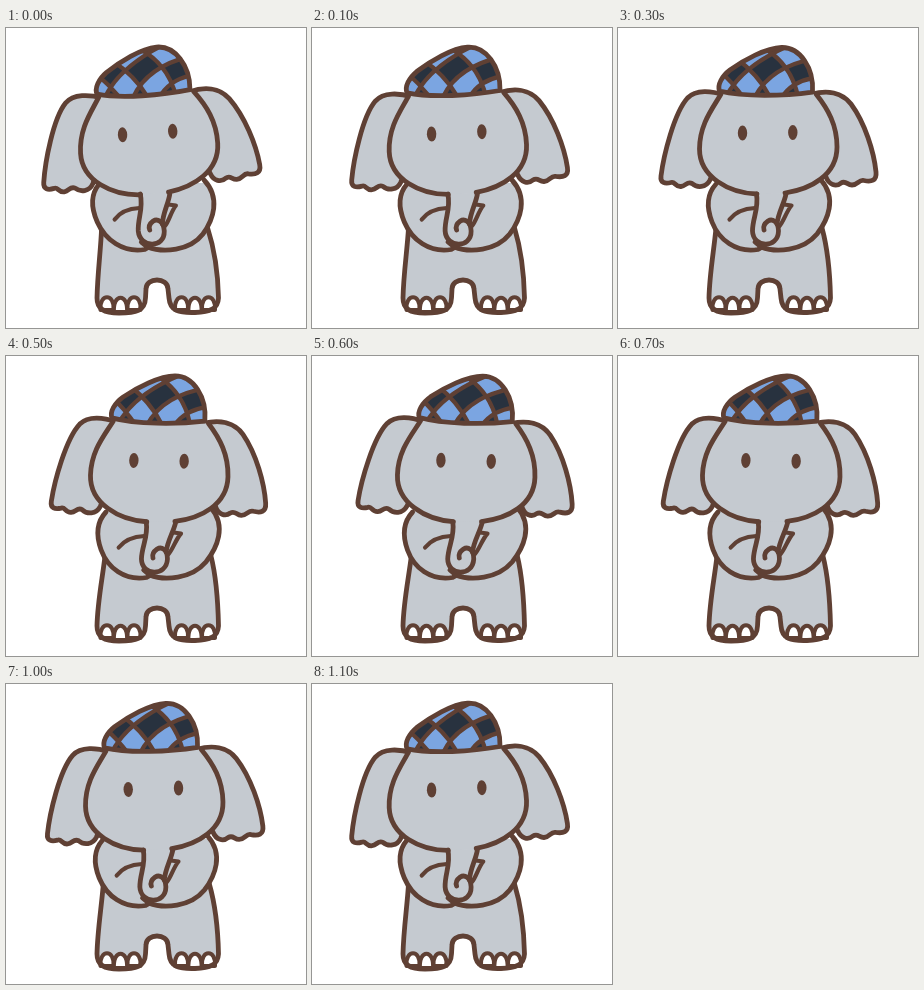
Recreate the animation shown at these times as an HTML page. Size 300 px wide and 300 px high, loop 1.2 s.

```html
<!DOCTYPE html>
<html lang="en">
<head>
<meta charset="utf-8">
<title>Swaying elephant</title>
<style>
  html, body { margin: 0; width: 100%; height: 100%; overflow: hidden; background: #fff; }
  svg { display: block; width: 100vw; height: 100vh; }
  .line { fill: none; stroke: #5f4034; stroke-width: 4.8; stroke-linecap: round; stroke-linejoin: round; }
  .skin { fill: #c5cad0; }
  .thin { stroke-width: 4.2; }
  .toe { fill: #fff; stroke-width: 4; }
</style>
</head>
<body>
<svg viewBox="0 0 300 300">
  <defs>
    <clipPath id="hatShape"><path id="hatClip"/></clipPath>
  </defs>
  <g id="ears">
    <path class="line skin" d="M106 67C94 63 78 61 69.500 70C56 85 45.500 128 43 148C42 155 47 156 53 154.500C57 153 57 159 63 158.500C68 158 69 153 74 155.500C79 160 88 160 92 152L110 110Z"/>
    <path id="rightEar" class="line skin" d="M194 66C209 62 224 64 233 76C247 95 256 124 258 144C259 153 253 154 246 152.500C241 151 240 157 234 157C229 157 228 152 223 155C218 159 211 157 208 149L190 110Z"/>
  </g>
  <g id="body"></g>
  <g id="head">
    <path class="skin" d="M103 66C95 80 81.500 96 81.500 121C81.500 149 111 165 139 166L167 165C193 161 219 147 219 119C219 97 210 81 198 66Z"/>
    <path class="line" d="M103 66C95 80 81.500 96 81.500 121C81.500 149 111 165 139 166M167 165C193 161 219 147 219 119C219 97 210 81 198 66"/>
    <ellipse cx="124.500" cy="105" rx="4.700" ry="7.500" fill="#5f4034"/>
    <ellipse cx="174.800" cy="104.500" rx="4.700" ry="7.500" fill="#5f4034"/>
    <g clip-path="url(#hatShape)">
      <rect x="90" y="10" width="120" height="70" fill="#7ba5e1"/>
      <path id="checks" fill="#28323f" fill-rule="evenodd"/>
      <path id="weave" class="line thin"/>
    </g>
    <path id="hat" class="line"/>
  </g>
  <g id="trunk"></g>
</svg>
<script>
const $ = id => document.getElementById(id);

const hatPath = "M101.500 63C99 57 104 48 112 42C126 32 148 20 163.500 19.500C182 19 196 40 194.500 64C166 68 126 69 101.500 63Z";
$("hatClip").setAttribute("d", hatPath);
$("hat").setAttribute("d", hatPath);

// Crossing any seam flips the colour of the checks.
const rising = ["M106 73Q120 40 170 18", "M135 73Q150 38 200 30", "M162 73Q172 52 202 49"];
const falling = ["M100 41Q116 56 128 73", "M118 30Q142 48 154 73", "M142 18Q174 34 181 73"];
$("weave").setAttribute("d", [...rising, ...falling].join(""));
$("checks").setAttribute("d",
  rising.map(d => d + "L300 0V100H100Z").join("") +
  falling.map(d => d + "L300 100V-300H100Z").join(""));

const bendable = [];
function addPart(parent, className, d) {
  const node = document.createElementNS("http://www.w3.org/2000/svg", "path");
  node.setAttribute("class", className);
  $(parent).append(node);
  bendable.push({ node, d });
}

const torso = "M98 200C96 222 91.500 246 91 270C91 281 98 285 113 285C130 285 139 283 139.500 270L140 261C140 249 162 249 162 261L163 270C164 283 173 285 189 284.500C204 284 212 281 212.500 270C212 246 210 222 204 200";
addPart("body", "skin", torso + "Z");
for (const center of [114.5, 189]) {
  for (const side of [-1, 1, 0]) {
    const x = center + side * 13.5;
    const base = 284 - 2 * Math.abs(side);
    addPart("body", "line toe", `M${x - 6.5} ${base}C${x - 8} 265 ${x + 8} 265 ${x + 6.5} ${base}Z`);
  }
}
addPart("body", "line", torso);
addPart("body", "skin", "M99 155C88 165 89 181 94 193C102 213 118 224 141 221C160 226 184 223 198 207C209 193 218 172 206 155Z");
addPart("body", "line", "M98 156C88 167 89 181 94 194C101 212 118 225 140 221.500L146 218");
addPart("body", "line", "M203 152C219 170 210 192 199 206C185 223 158 225 143 219L137 214");
addPart("body", "line thin", "M111.500 191.500C118 183 127 180.500 137 180");

addPart("trunk", "skin", "M139 168C141 181 135 192 135 203C135 218 160 221 161 204L160 188L167 168Z");
addPart("trunk", "line", "M138.500 166C141 181 134.500 190 134.500 203C135 220 160 221 160.500 203C160.500 193 154 190.500 150 193C146.500 195.500 145 199 146 202");
addPart("trunk", "line", "M168 166C166 176 160 185 159 196");
addPart("trunk", "line thin", "M166 176.500L173.500 177.500C168 184 166 193 161.500 198");

function bend(d, sway) {
  return d.replace(/(-?[\d.]+) (-?[\d.]+)/g, (_, x, y) =>
    `${(+x + sway * Math.max(0, 245 - y) / 150).toFixed(2)} ${y}`);
}

function draw(ms) {
  const step = Math.floor(ms % 1200 / 100);
  const k = Math.min(step, 12 - step);
  const sway = -8 + 3.27 * k - 0.2 * k * k;
  const tilt = `rotate(${sway * 0.425} 150 240)`;
  $("head").setAttribute("transform", tilt);
  $("ears").setAttribute("transform", tilt);
  $("rightEar").setAttribute("transform", `rotate(${sway * 0.15} 200 66)`);
  for (const { node, d } of bendable) node.setAttribute("d", bend(d, sway));
}

const start = performance.now();
function tick() {
  draw(performance.now() - start);
  requestAnimationFrame(tick);
}
tick();
</script>
</body>
</html>
```
